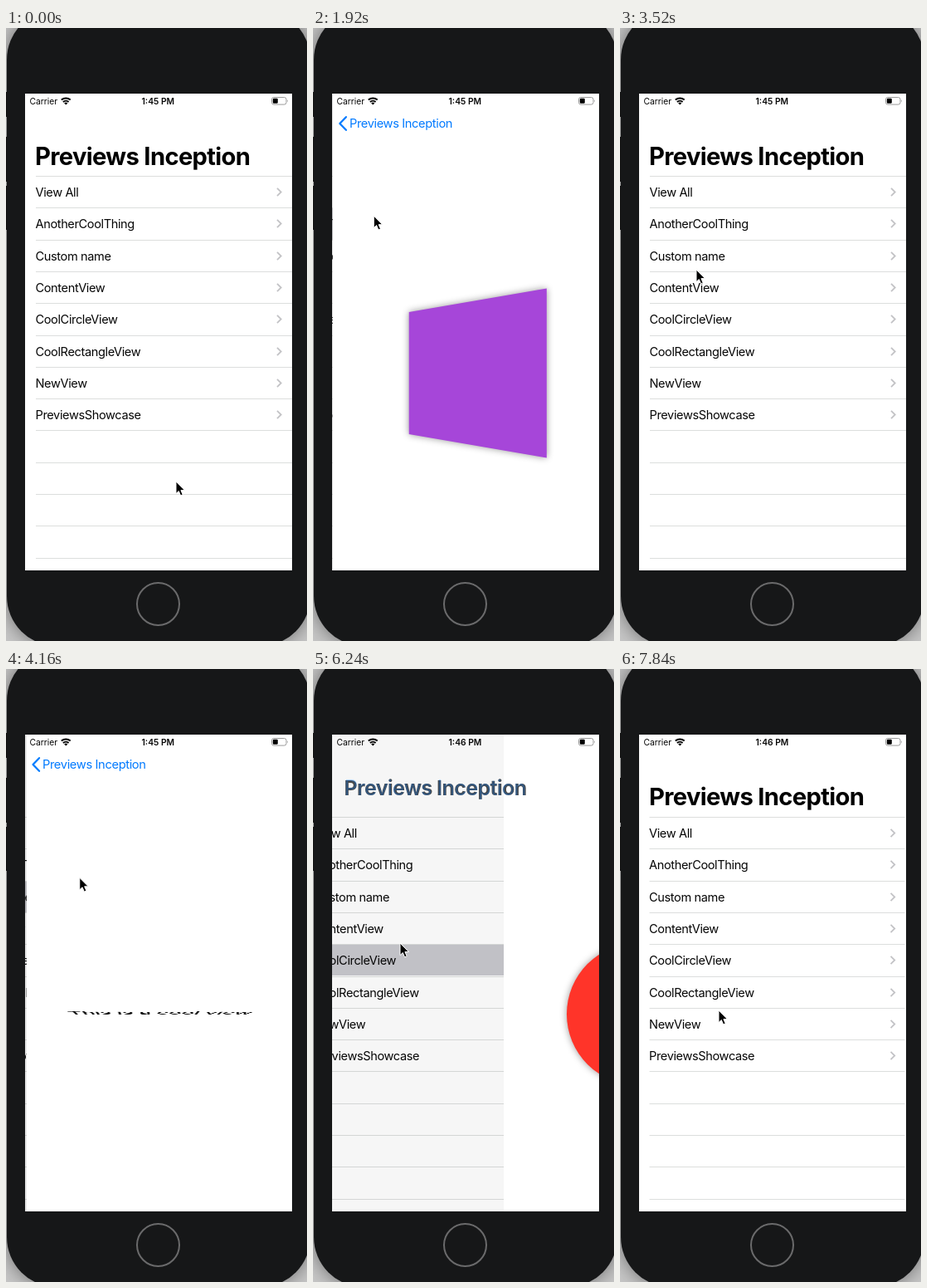
An HTML page for the animation above (8 s loop, 363 by 738 pixels).

```html
<!DOCTYPE html>
<html lang="en">
<head>
<meta charset="utf-8">
<title>Previews Inception</title>
<style>
  html, body { margin: 0; width: 100%; height: 100%; overflow: hidden; background: #c6c6c6; }
  body { position: relative; font-family: Inter, Roboto, sans-serif; color: #060606; }
  body * { position: absolute; white-space: pre; }
  svg { overflow: visible; }
  svg * { position: static; }
  .body { left: 1px; top: -22px; width: 366px; height: 766px; border-radius: 60px; background: #161718;
          box-shadow: 0 0 22px rgba(0, 0, 0, .45); }
  .side { left: 0; width: 1px; background: #111; }
  .home { left: 157px; top: 667px; width: 49px; height: 49px; border: 2.5px solid #6a6a6b; border-radius: 50%; }
  .screen { left: 23px; top: 79px; width: 322px; height: 573.5px; overflow: hidden; background: #fff; }
  .list, .page, .shade { left: 0; top: 0; width: 322px; height: 574px; background: #fff; }
  .shade { background: #000; }
  .row { left: 0; width: 322px; height: 38.3px; font-size: 14.6px; line-height: 40px; letter-spacing: -.027em; }
  .row i { left: 0; top: 0; width: 322px; height: 38.3px; background: #c8c8cd; opacity: 0; }
  .row span { left: 12.5px; }
  .row svg { left: 303px; top: 14.2px; }
  .line { left: 13px; width: 309px; height: 1px; background: #dcdedd; }
  .square, .circle { left: 75.5px; top: 251px; width: 171px; height: 171px; }
  .square { background: #a646d9; }
  .circle { background: #ff3429; border-radius: 50%; }
  .soft { left: 0; top: 0; width: 322px; height: 574px; filter: drop-shadow(0 0 4px rgba(0, 0, 0, .4)); }
  .words { left: 0; top: 315px; width: 322px; text-align: center; font-size: 26px; line-height: 40px;
           font-weight: 500; letter-spacing: -.01em; }
  .nav { left: 0; top: -20px; line-height: 40px; transform-origin: 0 50%; }
  .large { font-size: 29.2px; font-weight: 700; letter-spacing: -.023em; color: #000; }
  .back { font-size: 14.6px; letter-spacing: -.026em; color: #007aff; }
  .status { top: 1px; line-height: 16px; font-size: 10.3px; }
</style>
</head>
<body>
<div class="body"></div>
<div class="side" style="top:77px;height:30px"></div>
<div class="side" style="top:131px;height:54px"></div>
<div class="side" style="top:190px;height:53px"></div>
<div class="home"></div>

<div class="screen">
  <div class="list" id="list"></div>
  <div class="shade" id="shade"></div>
  <div class="page" id="page">
    <div class="soft"><div class="square" id="square"></div></div>
    <div class="words" id="words">This is a cool view</div>
    <div class="soft"><div class="circle" id="circle"></div></div>
  </div>
  <div class="nav large" id="large">Previews Inception</div>
  <div class="nav back" id="back">Previews Inception</div>
  <svg id="arrow" width="10" height="18" style="left:8px;top:27px" fill="none" stroke="#007aff" stroke-width="2.3" stroke-linecap="round" stroke-linejoin="round"><path d="M8.7 1.2 1.2 9l7.5 7.8"/></svg>

  <div class="status" style="left:5.5px">Carrier</div>
  <svg width="13" height="10" style="left:43px;top:4px" fill="none" stroke="#000" stroke-width="2">
    <path d="M.8 3.6a8 8 0 0 1 10.9 0M2.9 6a5 5 0 0 1 6.7 0"/><path d="M4.2 7.4a3 3 0 0 1 4.1 0L6.25 9.6z" fill="#000" stroke="none"/>
  </svg>
  <div class="status" id="clock" style="left:140.5px;font-weight:600"></div>
  <svg width="22" height="10" style="left:297px;top:3.5px">
    <rect x=".5" y=".5" width="17.5" height="8.6" rx="2.4" fill="none" stroke="#9a9a9a"/>
    <rect x="1.8" y="1.8" width="6" height="6" rx="1.2"/><path d="M19.2 3.2q1.6 1.6 0 3.2z" fill="#9a9a9a"/>
  </svg>
</div>

<svg id="cursor" width="12" height="18" style="left:0;top:0"><path d="M0 0v14.6l3.3-3.1 2.3 5.4 2.6-1.1-2.3-5.2h4.6z" stroke="#fff" stroke-width="1"/></svg>

<script>
const LOOP = 8000, STEP = 160, WIDTH = 322, ROW = 38.3, TOP = 99;
const $ = id => document.getElementById(id);
const clamp = v => Math.max(0, Math.min(1, v));
const mix = (a, b, k) => a + (b - a) * k;

const names = ['View All', 'AnotherCoolThing', 'Custom name', 'ContentView',
  'CoolCircleView', 'CoolRectangleView', 'NewView', 'PreviewsShowcase'];

// Each visit opens a row's page at "push" and leaves it at "pop".
const visits = [
  { row: 1, view: 'square', push: 1486, pop: 2545 },
  { row: 2, view: 'words', push: 3760, pop: 5120 },
  { row: 4, view: 'circle', push: 6165, pop: 7430 }
];

// Pointer path: time, x, y.
const path = [
  [0, 205, 546], [320, 205, 546], [1300, 75, 247], [1760, 75, 247],
  [2400, 64, 113], [2640, 64, 113], [3440, 92, 291], [3920, 92, 291],
  [4720, 77, 107], [5200, 77, 107], [5920, 105, 336], [6240, 105, 330],
  [7040, 78, 110], [7360, 78, 110], [7840, 119, 411], [8000, 121, 416]
];

$('list').innerHTML = names.map((name, i) =>
  `<div class="row" style="top:${TOP + i * ROW}px"><i></i><span>${name}</span>
   <svg width="7" height="11" fill="none" stroke="#c3c3c6" stroke-width="1.8"><path d="M1 .8 5.7 5.5 1 10.2"/></svg></div>`
).join('') + Array.from({ length: 13 }, (_, i) =>
  `<div class="line" style="top:${TOP + i * ROW}px"></div>`).join('');
const marks = [...document.querySelectorAll('.row i')];

// Navigation easing, cubic-bezier(.36, .66, .04, 1).
function ease(x) {
  if (x <= 0 || x >= 1) return clamp(x);
  const curve = (s, a, b) => 3 * (1 - s) ** 2 * s * a + 3 * (1 - s) * s * s * b + s ** 3;
  let low = 0, high = 1;
  for (let i = 0; i < 24; i++) {
    const mid = (low + high) / 2;
    if (curve(mid, .36, .04) < x) low = mid; else high = mid;
  }
  return curve(low, .66, 1);
}

function pointer(t) {
  const i = Math.max(1, path.findIndex(p => p[0] >= t));
  const [t0, x0, y0] = path[i - 1], [t1, x1, y1] = path[i];
  const u = clamp((t - t0) / (t1 - t0)), k = u * u * (3 - 2 * u);
  return [mix(x0, x1, k), mix(y0, y1, k)];
}

function draw(t) {
  const visit = visits.find(v => t >= v.push - 90 && t < v.pop + 500);
  const leaving = visit ? ease((t - visit.pop) / 500) : 0;
  const open = visit ? ease((t - visit.push) / 500) * (1 - leaving) : 0;

  $('list').style.transform = `translateX(${-.3 * WIDTH * open}px)`;
  $('shade').style.opacity = .1 * open;
  $('page').style.transform = `translateX(${WIDTH * (1 - open)}px)`;
  marks.forEach((mark, i) => mark.style.opacity = visit && visit.row === i ? 1 - leaving : 0);
  for (const { view } of visits) $(view).style.visibility = visit && visit.view === view ? 'visible' : 'hidden';

  const spin = .28;
  $('square').style.transform = `perspective(171px) rotateY(${71.5 + (t - 1600) * spin}deg)`;
  $('words').style.transform = `perspective(400px) skewX(-15deg) rotateX(${145 + (t - 4960) * spin}deg)`;

  // The large title shrinks and cross-fades into the back button.
  const q = open ** 1.2, width = mix(257, 123, q);
  const place = (id, full, alpha) => {
    $(id).style.transform = `translate(${mix(12, 21, q)}px, ${mix(75.5, 36, q)}px) scale(${width / full})`;
    $(id).style.opacity = alpha;
  };
  const pressed = visit && t >= visit.pop ? .2 + .8 * clamp((t - visit.pop) / 300) : 1;
  place('large', 257, 1 - q);
  place('back', 123, q * pressed);
  $('arrow').style.opacity = clamp((open - .7) / .3) * pressed;
  $('arrow').style.transform = `translateX(${(1 - open) * 55}px)`;

  $('clock').textContent = t < 4320 ? '1:45 PM' : '1:46 PM';
  const [x, y] = pointer(t);
  $('cursor').style.transform = `translate(${x}px, ${y}px)`;
}

function frame() {
  draw(Math.floor(performance.now() % LOOP / STEP) * STEP);
  requestAnimationFrame(frame);
}
frame();
</script>
</body>
</html>
```
